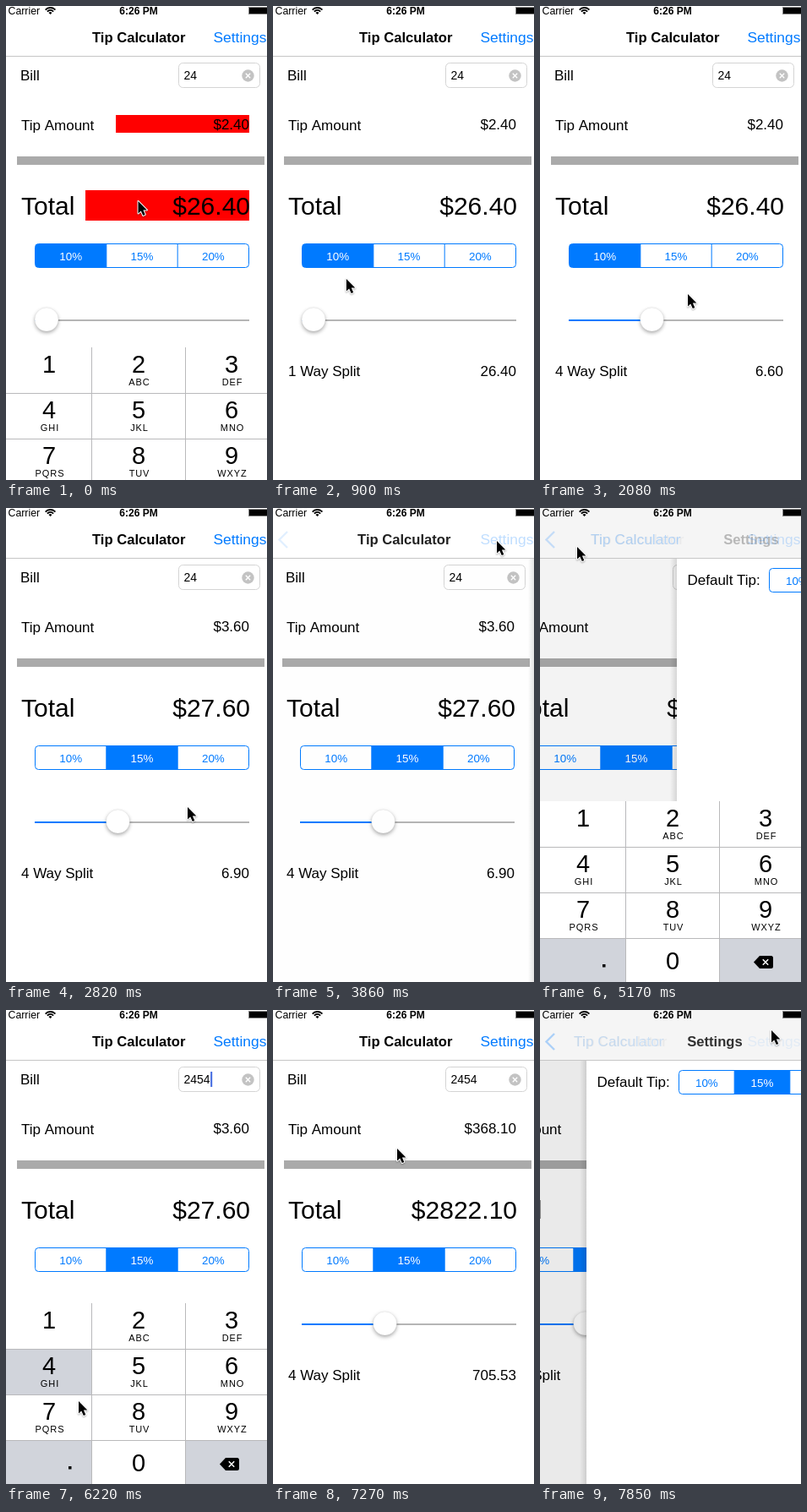
These frames come from a looping animation (309x561 px, 8000 ms). An HTML page with a canvas:

```html
<!DOCTYPE html>
<html lang="en">
<head>
<meta charset="utf-8">
<title>Tip Calculator</title>
<style>
html, body { margin: 0; width: 100%; height: 100%; overflow: hidden; background: #fff; }
canvas { display: block; width: 309px; height: 561px; }
</style>
</head>
<body>
<canvas></canvas>
<script>
const W = 309, H = 561, LOOP = 8000, TICK = LOOP / 54;
const BLUE = '#007aff', KEY_GREY = '#d1d4db';
const REST = 317, OPEN = -3;          // left edge of the settings page when closed / open
const KEYS_TOP = 347, KEYS_HIDDEN = 214;

const canvas = document.querySelector('canvas');
const ctx = canvas.getContext('2d');
const scale = window.devicePixelRatio || 1;
canvas.width = W * scale;
canvas.height = H * scale;

// Motion tables: [tick, value...]
const cursorPath = [
  [4, 156.5, 231], [7, 52, 369], [8, 49, 371], [12, 133, 371], [14, 175, 341],
  [16, 164, 297], [17, 164, 298], [19, 215, 354], [20, 215, 354], [23, 265, 62],
  [24, 265, 62], [25, 265, 39], [27, 265, 39], [30, 207, 86], [31, 207, 86],
  [34, 44, 46], [35, 44, 46], [38, 157, 478], [39, 157, 478], [41, 58, 432],
  [42, 86, 463], [45, 148, 167], [48, 148, 167], [49, 147, 164], [52, 274, 26], [53, 274, 24]
];
const knobPath = [[8, 48], [12, 132.5]];
const pagePath = [
  [25, REST], [26, 310], [27, 55], [28, 3], [29, OPEN],
  [33, OPEN], [34, 16], [35, 162], [36, 298], [37, REST], [51, REST], [52, 310], [53, 55]
];
const keysPath = [
  [0, 57], [1, 200], [2, KEYS_HIDDEN], [33, KEYS_HIDDEN], [34, 120], [35, 0],
  [45, 0], [46, 57], [47, 200], [48, KEYS_HIDDEN]
];

// Navigation bar, as functions of the page edge
const backX = [[-3, 29], [55, 40], [162, 60], [REST, 102]];
const backAlpha = [[-3, 1], [55, .16], [162, .25], [270, 0]];
const titleAlpha = [[-3, 0], [55, .04], [162, .04], [310, .87], [REST, 1]];
const chevronAlpha = [[-3, 1], [55, .3], [162, .2], [310, .12], [REST, 0]];
const headX = [[-3, 184], [55, 207], [162, 250], [REST, 306]];
const headAlpha = [[-3, 1], [55, .8], [162, .25], [280, 0]];
const buttonAlpha = [[-3, 0], [55, .08], [162, .2], [310, .25], [REST, 1]];

function track(table, at) {
  if (at <= table[0][0]) return table[0].slice(1);
  for (let i = 1; i < table.length; i++) {
    const a = table[i - 1], b = table[i];
    if (at <= b[0]) {
      const k = (at - a[0]) / (b[0] - a[0]);
      return a.slice(1).map((v, j) => v + (b[j + 1] - v) * k);
    }
  }
  return table[table.length - 1].slice(1);
}
const value = (table, at) => track(table, at)[0];
const money = v => (Math.round(v * 100 + 1e-4) / 100).toFixed(2);

function text(str, x, y, size, { color = '#000', align = 'left', bold = false, alpha = 1, gap = 0 } = {}) {
  if (alpha <= 0) return;
  ctx.save();
  ctx.globalAlpha = alpha;
  ctx.font = `${bold ? 'bold ' : ''}${size}px "Liberation Sans", Arial, sans-serif`;
  ctx.letterSpacing = gap + 'px';
  ctx.textAlign = align;
  ctx.fillStyle = color;
  ctx.fillText(str, x, y);
  ctx.restore();
}

function rect(x, y, w, h, color) {
  ctx.fillStyle = color;
  ctx.fillRect(x, y, w, h);
}

function circle(x, y, r, color) {
  ctx.beginPath();
  ctx.arc(x, y, r, 0, Math.PI * 2);
  ctx.fillStyle = color;
  ctx.fill();
}

function line(points, color, width = 1) {
  ctx.beginPath();
  points.forEach(([x, y]) => ctx.lineTo(x, y));
  ctx.strokeStyle = color;
  ctx.lineWidth = width;
  ctx.stroke();
}

function cross(x, y, r, width) {
  line([[x - r, y - r], [x + r, y + r]], '#fff', width);
  line([[x - r, y + r], [x + r, y - r]], '#fff', width);
}

function segments(x, y, w, h, selected) {
  const cell = w / 3;
  ctx.save();
  ctx.beginPath();
  ctx.roundRect(x, y, w, h, 4);
  ctx.save();
  ctx.clip();
  rect(x + cell * selected, y, cell, h, BLUE);
  ctx.restore();
  ctx.strokeStyle = BLUE;
  ctx.lineWidth = 1;
  ctx.stroke();
  ['10%', '15%', '20%'].forEach((label, i) => {
    if (i) line([[x + cell * i, y], [x + cell * i, y + h]], BLUE);
    text(label, x + cell * (i + .5), y + 19, 13.4,
      { color: i === selected ? '#fff' : BLUE, align: 'center' });
  });
  ctx.restore();
}

function slider(knob) {
  rect(34, 371, 254, 2, '#b5b5b5');
  rect(34, 371, knob - 34, 2, BLUE);
  ctx.save();
  ctx.shadowColor = 'rgba(0,0,0,.32)';
  ctx.shadowBlur = 4 * scale;
  ctx.shadowOffsetY = 2 * scale;
  circle(knob, 371, 14, '#fff');
  ctx.restore();
  ctx.beginPath();
  ctx.arc(knob, 371, 14, 0, Math.PI * 2);
  ctx.strokeStyle = 'rgba(0,0,0,.12)';
  ctx.lineWidth = .5;
  ctx.stroke();
}

function calculator(s) {
  const tip = s.bill * (s.rate ? .15 : .1), total = s.bill + tip;
  const ways = Math.round(1 + (s.knob - 48) / 28);
  const right = { align: 'right' };

  text('Bill', 17, 88, 17);
  ctx.beginPath();
  ctx.roundRect(204.5, 67.5, 96, 29, 5);
  ctx.strokeStyle = '#d4d4d4';
  ctx.lineWidth = 1;
  ctx.stroke();
  text(s.typed, 210.5, 87, 14);
  if (s.caret) rect(211 + s.typed.length * 7.8, 73, 2, 18, '#4169e1');
  circle(286.5, 82.5, 7.2, '#c3c3c3');
  cross(286.5, 82.5, 2.7, 1.3);

  if (s.flash) {
    rect(130, 129, 158, 21, '#f00');
    rect(94, 218, 194, 36, '#f00');
  }
  text('Tip Amount', 18, 147, 17);
  text('$' + money(tip), 288, 146, 17, right);
  rect(13, 178, 293, 10, '#aaa');
  text('Total', 18, 247, 30);
  text('$' + money(total), 289, 247, 30, right);
  segments(34.5, 281.5, 253, 28, s.rate);
  slider(s.knob);
  text(ways + ' Way Split', 18, 438, 17);
  text(money(total / ways), 288, 438, 17, right);
}

function settingsPage(s) {
  const edge = ctx.createLinearGradient(s.page - 8, 0, s.page, 0);
  edge.addColorStop(0, 'rgba(0,0,0,0)');
  edge.addColorStop(1, 'rgba(0,0,0,.12)');
  rect(s.page - 8, 0, 8, H, edge);
  rect(s.page, 0, W + 10, H, '#fff');
  text('Default Tip:', s.page + 12.5, 91, 17);
  segments(s.page + 109.5, 71.5, 197, 28, s.preset);
}

function navigationBar(s) {
  const p = s.page, moving = p > OPEN && p < 305;
  rect(0, 0, W, 59, moving ? '#f5f5f5' : '#fff');
  rect(0, 59, W, 1, '#c6c6c6');

  text('Carrier', 2.5, 10, 12.3);
  text('6:26 PM', 157, 10, 12, { bold: true, align: 'center' });
  ctx.lineCap = 'butt';
  [[8, 1.8], [5, 1.8]].forEach(([r, width]) => {
    ctx.beginPath();
    ctx.arc(52.5, 10, r, Math.PI * 1.24, Math.PI * 1.76);
    ctx.strokeStyle = '#000';
    ctx.lineWidth = width;
    ctx.stroke();
  });
  ctx.beginPath();
  ctx.moveTo(52.5, 10);
  ctx.arc(52.5, 10, 2.8, Math.PI * 1.24, Math.PI * 1.76);
  ctx.fillStyle = '#000';
  ctx.fill();
  rect(287, 1, 22, 9, '#888');
  rect(288, 2, 21, 7, '#000');

  const x = value(backX, p);
  text('Tip Calculator', x, 43, 16.6, { bold: true, alpha: value(titleAlpha, p) });
  if (p < REST) {
    text('Tip Calculator', x, 43, 17.4, { color: BLUE, alpha: value(backAlpha, p) });
    text('Settings', value(headX, p), 43, 16.6,
      { bold: true, align: 'center', alpha: value(headAlpha, p) });
    ctx.save();
    ctx.globalAlpha = value(chevronAlpha, p);
    line([[17, 28], [7.5, 37.5], [17, 47]], BLUE, 2.4);
    ctx.restore();
  }
  text('Settings', 245.5, 43, 17.4, { color: BLUE, alpha: value(buttonAlpha, p) });
}

function keyboard(s) {
  if (s.keys >= KEYS_HIDDEN) return;
  const letters = ['', 'ABC', 'DEF', 'GHI', 'JKL', 'MNO', 'PQRS', 'TUV', 'WXYZ'];
  const edges = [0, 102, 213, 321], centers = [51, 157, 267];
  const center = { align: 'center' };
  ctx.save();
  ctx.translate(0, KEYS_TOP + s.keys);
  rect(0, 0, W, 215, '#fff');
  letters.forEach((sub, i) => {
    const col = i % 3, y = 54 * Math.floor(i / 3);
    if (s.pressed === i + 1) rect(edges[col], y, edges[col + 1] - edges[col], 54, KEY_GREY);
    text(String(i + 1), centers[col], y + 30, 29, center);
    text(sub, centers[col] + 1, y + 45, 11, { align: 'center', gap: .9 });
  });
  rect(0, 162, 102, 54, KEY_GREY);
  rect(213, 162, 96, 54, KEY_GREY);
  text('0', 157, 199, 29, center);
  rect(74, 193, 3.5, 3.5, '#000');

  ctx.beginPath();
  [[253, 190.5], [260, 183]].forEach(([x, y]) => ctx.lineTo(x, y));
  ctx.arcTo(276, 183, 276, 190, 2.5);
  ctx.arcTo(276, 198, 268, 198, 2.5);
  ctx.lineTo(260, 198);
  ctx.closePath();
  ctx.fillStyle = '#000';
  ctx.fill();
  cross(267, 190.5, 3.2, 1.5);

  [54, 108, 162].forEach(y => rect(0, y, W, 1, '#b9b9bb'));
  [101, 212].forEach(x => rect(x, 0, 1, 215, '#b9b9bb'));
  ctx.restore();
}

function pointer([x, y]) {
  ctx.save();
  ctx.translate(x, y);
  ctx.beginPath();
  [[0, 0], [0, 14.5], [3.3, 11.4], [5.8, 17], [8.3, 15.9], [5.9, 10.5], [10.4, 10.4]]
    .forEach(([px, py]) => ctx.lineTo(px, py));
  ctx.closePath();
  ctx.shadowColor = 'rgba(0,0,0,.3)';
  ctx.shadowBlur = 2 * scale;
  ctx.shadowOffsetY = scale;
  ctx.lineJoin = 'round';
  ctx.strokeStyle = '#fff';
  ctx.lineWidth = 2;
  ctx.stroke();
  ctx.shadowColor = 'transparent';
  ctx.fillStyle = '#000';
  ctx.fill();
  ctx.restore();
}

function stateAt(tick) {
  return {
    page: value(pagePath, tick),
    keys: value(keysPath, tick),
    knob: value(knobPath, tick),
    rate: tick < 17 ? 0 : 1,
    preset: tick < 31 ? 0 : 1,
    typed: tick < 39 ? '24' : tick < 41 ? '245' : '2454',
    bill: tick < 46 ? 24 : 2454,
    caret: tick >= 36 && tick < 46,
    pressed: tick === 39 ? 5 : tick === 41 || tick === 42 ? 4 : 0,
    flash: tick < 2 || tick === 46 || tick === 47
  };
}

function draw(tick) {
  const s = stateAt(tick);
  const covered = (REST - s.page) / (REST - OPEN);
  ctx.setTransform(scale, 0, 0, scale, 0, 0);
  rect(0, 0, W, H, '#fff');
  ctx.save();
  ctx.translate(-Math.round((REST - s.page) * .3), 0);
  calculator(s);
  ctx.restore();
  if (covered > 0) {
    rect(0, 0, W, H, `rgba(0,0,0,${covered * .1})`);
    settingsPage(s);
  }
  navigationBar(s);
  keyboard(s);
  pointer(track(cursorPath, tick));
}

const start = performance.now();
function frame() {
  const t = (performance.now() - start) % LOOP;
  draw(Math.min(53, Math.floor(t / TICK + .11)));
  requestAnimationFrame(frame);
}
frame();
</script>
</body>
</html>
```
